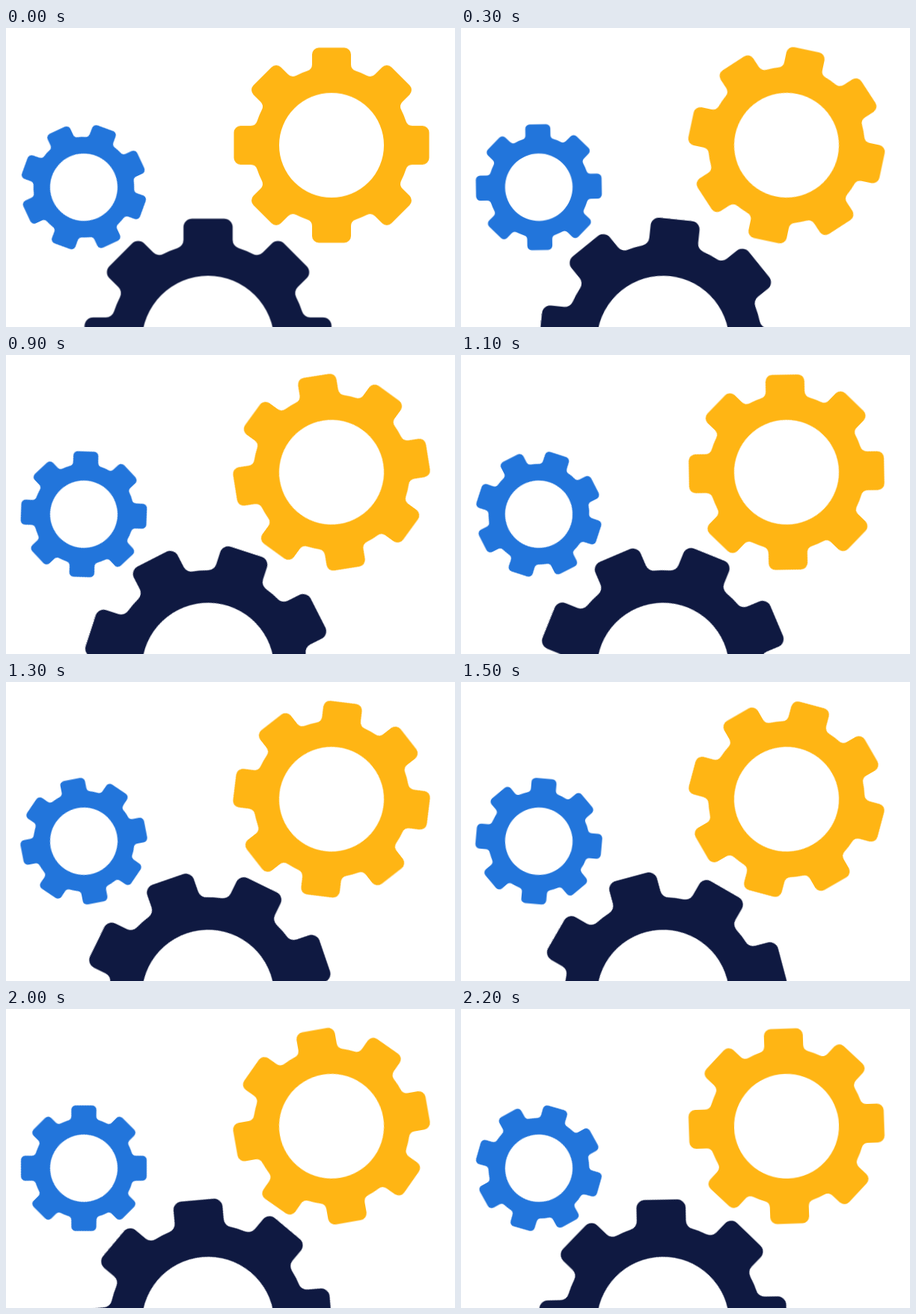
These frames come from a looping animation (600 px wide and 400 px high, 2.3 s). An HTML page:

```html
<!DOCTYPE html>
<html lang="en">
<head>
<meta charset="utf-8">
<title>Gears</title>
<style>
  html, body { margin: 0; width: 100%; height: 100%; overflow: hidden; background: #fff; }
  svg { display: block; width: 600px; height: 400px; }
  .gear {
    transform-origin: 0 0;
    fill-rule: evenodd;
    animation: spin 2300ms steps(23, end) infinite;
  }
  .yellow { fill: #ffb514; --from: 0deg; --to: 92deg; }
  .blue { fill: #2275db; --from: -25deg; --to: 159deg; }
  .navy { fill: #0f1941; --from: 0deg; --to: 46deg; }
  @keyframes spin {
    from { transform: rotate(var(--from)); }
    to { transform: rotate(var(--to)); }
  }
</style>
</head>
<body>
<svg viewBox="0 0 600 400">
  <g transform="translate(435 156.8)"><path class="gear yellow"/></g>
  <g transform="translate(104 213) scale(.644)"><path class="gear blue"/></g>
  <g transform="translate(270 420) scale(1.264)"><path class="gear navy"/></g>
</svg>
<script>
  const TEETH = 8, TIP = 130.5, ROOT = 104.5, HOLE = 70, HALF = 26, ROUND = 9;

  function gearPath() {
    // Fillet centre beside a tooth, and where the fillet meets the root circle
    const fx = HALF + ROUND;
    const fy = Math.sqrt((ROOT + ROUND) ** 2 - fx ** 2);
    const k = ROOT / (ROOT + ROUND);
    let d = '';

    for (let i = 0; i < TEETH; i++) {
      const a = i * 2 * Math.PI / TEETH, c = Math.cos(a), s = Math.sin(a);
      const at = (x, y) => `${(x * c + y * s).toFixed(2)} ${(x * s - y * c).toFixed(2)}`;
      const arc = (r, sweep, x, y) => `A${r} ${r} 0 0 ${sweep} ${at(x, y)}`;
      const line = (x, y) => `L${at(x, y)}`;

      d += i ? arc(ROOT, 1, -fx * k, fy * k) : `M${at(-fx * k, fy * k)}`;
      d += arc(ROUND, 0, -HALF, fy)
        + line(-HALF, TIP - ROUND) + arc(ROUND, 1, ROUND - HALF, TIP)
        + line(HALF - ROUND, TIP) + arc(ROUND, 1, HALF, TIP - ROUND)
        + line(HALF, fy) + arc(ROUND, 0, fx * k, fy * k);
    }
    d += `A${ROOT} ${ROOT} 0 0 1 ${-fx * k} ${-fy * k}Z`;
    const half = `a${HOLE} ${HOLE} 0 1 0 `;
    return d + `M${-HOLE} 0${half}${2 * HOLE} 0${half}${-2 * HOLE} 0Z`;
  }

  const shape = gearPath();
  document.querySelectorAll('.gear').forEach(gear => gear.setAttribute('d', shape));
</script>
</body>
</html>
```
